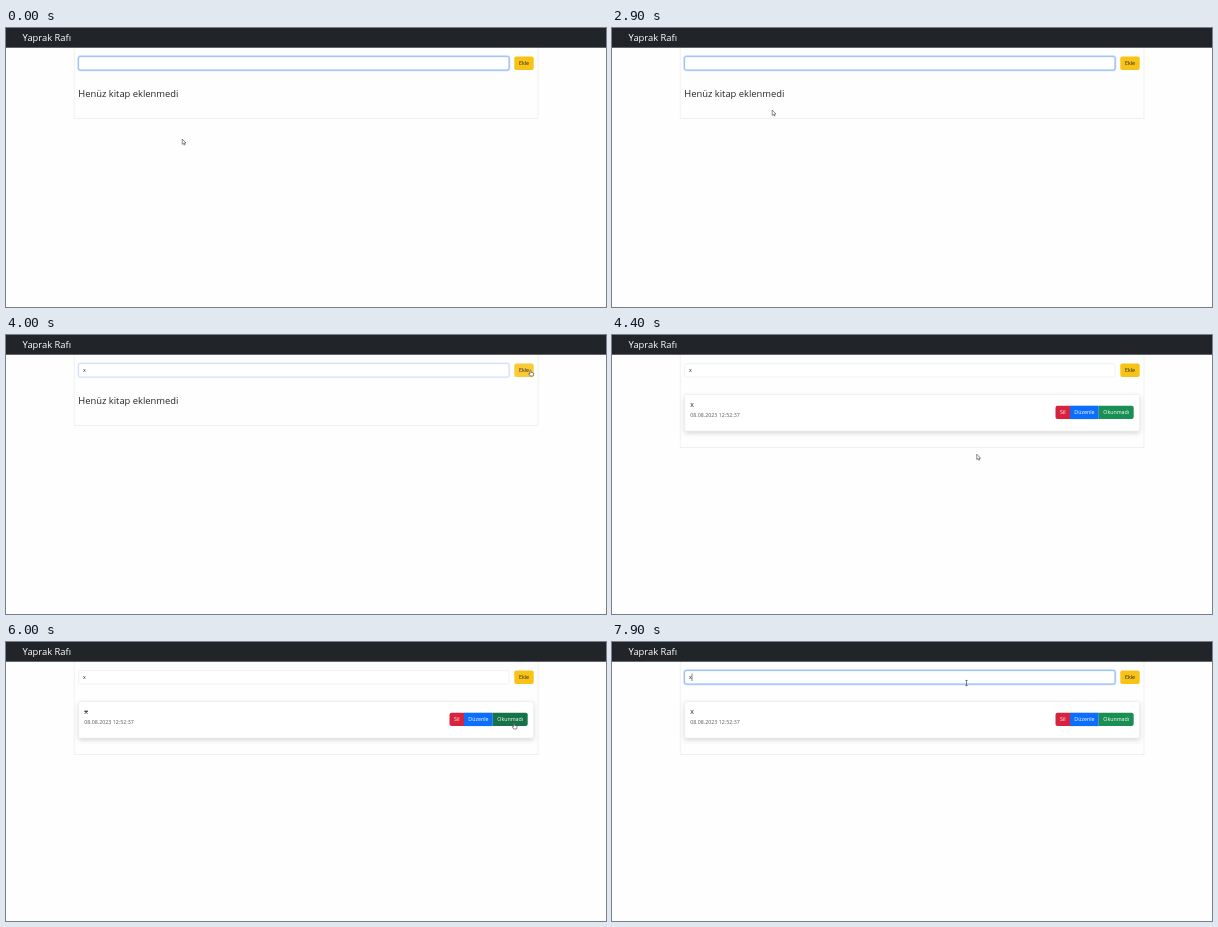
Animation, 600 px wide and 279 px high, one loop 8000 ms. Source, as an HTML page:

```html
<!DOCTYPE html>
<html lang="tr">
<head>
<meta charset="utf-8">
<title>Yaprak Rafı</title>
<style>
  html, body { margin: 0; height: 100%; overflow: hidden; background: #fefefe; }
  svg { display: block; width: 100%; height: 100%; font: 5.3px "Open Sans", "Noto Sans", sans-serif; fill: #212529; }
  .edge { fill: none; stroke: #ececee; stroke-width: .7; }
  #card { filter: drop-shadow(0 2.4px 2.6px rgba(0, 0, 0, .17)); }
  .label { fill: #fff; text-anchor: middle; }
  .pointer { fill: #fff; stroke: #222; stroke-width: .5; stroke-linejoin: round; }
</style>
</head>
<body>
<svg viewBox="0 0 600 279">
  <rect id="panel" class="edge" x="68.2" y="12" width="463.8"/>
  <rect width="600" height="19.7" fill="#212529"/>
  <text x="16.6" y="13.3" font-size="9.4" fill="#fff">Yaprak Rafı</text>

  <rect x="72.6" y="28.6" width="430.4" height="13.4" rx="2" fill="#fff" stroke="#e2e5e9" stroke-width=".5"/>
  <g id="focus" fill="none">
    <rect x="72.1" y="28.1" width="431.4" height="14.4" rx="2.5" stroke="#0d6efd" stroke-opacity=".25" stroke-width="1.5"/>
    <rect x="72.6" y="28.6" width="430.4" height="13.4" rx="2" stroke="#86b7fe" stroke-width=".7"/>
  </g>
  <text id="typed" x="76.9" y="37.3">x</text>
  <rect id="caret" y="31.5" width=".6" height="7.5" fill="#333"/>

  <rect id="add" x="508.3" y="28.4" width="19.4" height="13.6" rx="2"/>
  <text x="518" y="37.2" text-anchor="middle">Ekle</text>

  <text id="empty" x="72.3" y="68.5" font-size="9.4" font-weight="500">Henüz kitap eklenmedi</text>

  <g id="item">
    <rect id="card" x="72.7" y="59.5" width="454.8" height="36.6" rx="1.5" fill="#fff"/>
    <rect class="edge" x="72.7" y="59.5" width="454.8" height="36.6" rx="1.5"/>
    <text id="title" x="78.3" y="71.8" font-size="7" font-weight="500">x</text>
    <text x="78.3" y="82.3" fill="#555b61">08.08.2023 12:52:37</text>
    <path id="remove" d="M458 70.7h-12.5a2 2 0 0 0-2 2v9.4a2 2 0 0 0 2 2H458z"/>
    <path id="edit" d="M458 70.7h28.7v13.4H458z"/>
    <path id="read" d="M486.7 70.7h33a2 2 0 0 1 2 2v9.4a2 2 0 0 1-2 2h-33z"/>
    <g class="label">
      <text x="450.8" y="79.4">Sil</text>
      <text x="472.4" y="79.4">Düzenle</text>
      <text x="504.2" y="79.4">Okunmadı</text>
    </g>
  </g>

  <g id="mouse">
    <path id="arrow" class="pointer" d="M.2 0V5.3L1.4 4.3 2.2 6 3.1 5.6 2.3 4H4z"/>
    <path id="hand" class="pointer" d="M-.5.4Q0-.3.5.4V2.3L2.8 2.9Q3.2 3.1 3.1 3.8L2.6 6H-.3L-1.9 3.8Q-1.6 3-.5 3.8z"/>
    <path id="beam" fill="none" stroke="#333" stroke-width=".6" d="M-1.2-2.6H1.2M0-2.6V2.6M-1.2 2.6H1.2"/>
  </g>
</svg>
<script>
const LOOP = 8000, STEP = 100;
const $ = id => document.getElementById(id);
const show = (id, on) => $(id).style.display = on ? '' : 'none';

// Mouse stops: time, x, y
const stops = [
  [0, 176, 111], [200, 232, 153], [400, 254, 140], [1200, 254, 140],
  [1700, 51, 104], [2000, 150, 92], [2400, 228, 82], [2900, 160, 82],
  [3200, 150, 90], [3600, 556, 50], [3800, 524.5, 35], [4000, 524.5, 35],
  [4500, 346, 129], [4600, 346, 129], [5100, 505, 92], [5300, 508, 85],
  [5500, 506, 78], [6000, 508, 81], [6500, 507, 79], [6900, 503.5, 78],
  [7000, 503.5, 78], [7300, 354.5, 38], [7500, 354.5, 41], [8000, 354.5, 41]
];

function mouseAt(t) {
  const i = stops.findIndex(s => s[0] > t);
  const [t0, x0, y0] = stops[i - 1], [t1, x1, y1] = stops[i];
  const p = (t - t0) / (t1 - t0), e = p * p * (3 - 2 * p);
  return [x0 + (x1 - x0) * e, y0 + (y1 - y0) * e];
}

function draw(t) {
  const [x, y] = mouseAt(t);
  const inside = (l, r, top, bottom) => x >= l && x < r && y >= top && y < bottom;
  const typed = t >= 3400, added = t >= 4100;
  const focus = t < 4000 || t >= 7500 ? 1 : t === 4000 || t === 7400 ? .35 : 0;

  const blinkStart = t >= 7400 ? 7400 : typed ? 3400 : 170;
  show('caret', focus === 1 && t >= blinkStart && (t - blinkStart) % 1060 < 530);
  $('caret').setAttribute('x', typed ? 79.7 : 77.2);
  $('focus').style.opacity = focus;
  show('typed', typed);
  show('empty', !added);
  show('item', added);
  $('panel').setAttribute('height', added ? 100.6 : 78.6);
  $('title').style.textDecoration = t >= 6000 && t < 6700 ? 'line-through' : 'none';

  const paint = (id, over, base, hover) => {
    $(id).setAttribute('fill', over ? hover : base);
    return over;
  };
  const row = (l, r) => added && inside(l, r, 70.7, 84.1);
  const hand = [
    paint('add', inside(508, 528, 28, 42), '#f8c314', '#fbca35'),
    paint('remove', row(443.5, 458), '#d6243f', '#bb2d3b'),
    paint('edit', row(458, 486.7), '#0d6efd', '#0b5ed7'),
    paint('read', row(486.7, 521.7), '#198f54', '#157347')
  ].some(Boolean);
  const beam = inside(72, 503, 28, 42);
  show('hand', hand);
  show('beam', beam);
  show('arrow', !hand && !beam);
  $('mouse').setAttribute('transform', `translate(${x} ${y})`);
}

function tick() {
  draw(Math.floor(performance.now() % LOOP / STEP) * STEP);
  requestAnimationFrame(tick);
}
tick();
</script>
</body>
</html>
```
